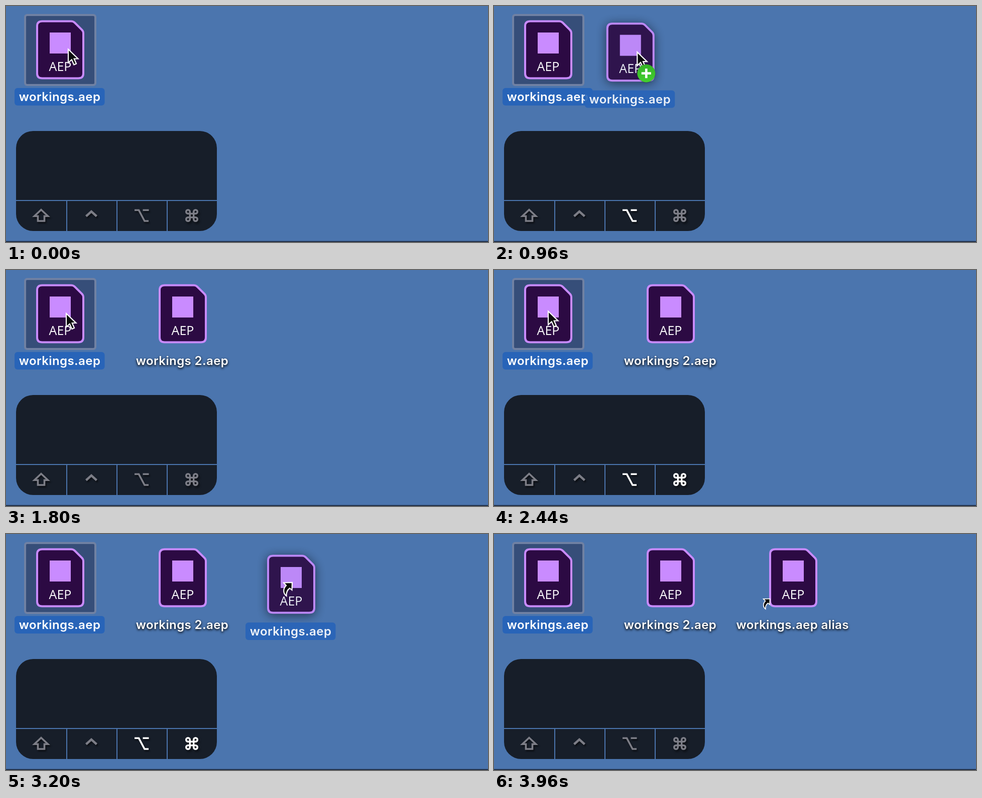
Write an HTML page that moves like this. It is 960 by 472 pixels and loops after 4 s.

```html
<!DOCTYPE html>
<html lang="en">
<head>
<meta charset="utf-8">
<title>Duplicate and alias by dragging</title>
<style>
  html, body { margin: 0; width: 100%; height: 100%; overflow: hidden; background: #4b75ae; }
  svg { display: block; width: 960px; height: 472px; }
  .label {
    font: 600 24px Inter, sans-serif; font-optical-sizing: none; letter-spacing: .4px;
    fill: #fff; text-anchor: middle;
  }
  .free { text-shadow: 0 2px 4px rgba(0, 0, 0, .75), 0 2px 5px rgba(0, 0, 0, .4); }
  .type {
    font: 500 25px "Open Sans", "Noto Sans", sans-serif; font-stretch: 90%;
    fill: #fff; text-anchor: middle;
  }
  .key { fill: none; stroke: #7d7e87; stroke-width: 3.6; filter: drop-shadow(2px 3px 1.5px rgba(0, 0, 0, .55)); }
  .key.on { stroke: #fff; }
  .pointer { fill: #0b0b0c; stroke: #fff; stroke-width: 2.2; stroke-linejoin: miter; }
  #ghost { opacity: .9; }
  #ghost .file { filter: drop-shadow(0 3px 10px rgba(0, 0, 0, .6)); }
</style>
</head>
<body>
<svg viewBox="0 0 960 472">
  <defs>
    <g id="file">
      <path d="M72 30.5H130Q134 30.5 137 33.5L151 47.5Q154 50.5 154 54.5V135Q154 144.5 144 144.5H72Q62 144.5 62 135V40Q62 30.5 72 30.5Z"
            fill="#2c0a43" stroke="#c98bff" stroke-width="4"/>
      <rect x="87" y="53" width="42" height="42" fill="#c98bff"/>
      <text class="type" x="108" y="129.5">AEP</text>
    </g>
    <g id="tag">
      <rect x="17" y="164" width="179.5" height="35" rx="6" fill="#2864b8"/>
      <text class="label" x="107" y="190">workings.aep</text>
    </g>
    <path id="bentArrow" class="pointer" d="M-17 .5L0 0L-.5 15L-5 11.5C-10 15-12 20-11.5 27C-18 22-19 13-12 6Z"/>
    <linearGradient id="green" x2="0" y2="1">
      <stop stop-color="#35b326"/>
      <stop offset="1" stop-color="#43cf2f"/>
    </linearGradient>
    <clipPath id="panelShape"><rect x="20" y="250" width="400" height="200" rx="34"/></clipPath>
  </defs>

  <rect width="960" height="472" fill="#4b75ae"/>
  <rect y="470" width="960" height="2" fill="#22324c"/>

  <g clip-path="url(#panelShape)">
    <rect x="20" y="250" width="400" height="200" fill="#171e29"/>
    <path d="M20 389H420M121 389V450M221 389V450M321 389V450" stroke="#4b75ae" stroke-width="2"/>
  </g>
  <path class="key" d="M70 407.5L83.5 420.3H76.5V430H63.5V420.3H56.5Z"/>
  <path class="key" d="M159.5 420.5L170 411L180.5 420.5" style="stroke-width:4.4"/>
  <path class="key" id="option" d="M256 408.3H264.5L276 430H284M272.5 408.3H284.5"/>
  <path class="key" id="command" transform="translate(355 404) scale(1.25)" style="stroke-width:2.8"
        d="M15 6v12a3 3 0 1 0 3-3H6a3 3 0 1 0 3 3V6a3 3 0 1 0-3 3h12a3 3 0 1 0-3-3"/>

  <rect x="38" y="18" width="140" height="140" rx="4" fill="#364e79" stroke="#7081a3" stroke-width="4"/>
  <use href="#file"/>
  <use href="#tag"/>

  <g id="copy">
    <use href="#file" x="244"/>
    <text class="label free" x="351" y="190">workings 2.aep</text>
  </g>
  <g id="alias">
    <use href="#file" x="488"/>
    <use href="#bentArrow" transform="translate(549.5 129.5) scale(.76)"/>
    <text class="label free" x="594.7" y="190">workings.aep alias</text>
  </g>

  <g id="ghost">
    <use class="file" href="#file"/>
    <use href="#tag"/>
  </g>

  <g id="cursor">
    <path id="arrow" class="pointer" d="M1.5 3.5V30.5L8.3 24.3L12.8 34.5L17.5 32.4L13.2 22.5H21Z"/>
    <g id="plus" transform="translate(19.5 46)">
      <circle cy="1" r="18.3" fill="#000" opacity=".2"/>
      <circle r="18" fill="url(#green)"/>
      <path d="M-9.5 0H9.5M0-9.5V9.5" stroke="#fff" stroke-width="4.6"/>
    </g>
    <use id="bent" href="#bentArrow" x="3.5" y="5"/>
  </g>
</svg>
<script>
  const LOOP = 4000, STEP = 40;

  // Pointer stops: time, x, y
  const stops = [
    [0, 122.5, 83], [440, 118.5, 87], [520, 118.5, 87], [640, 120, 84],
    [1160, 332, 90], [1440, 332, 90], [1760, 118.5, 83.5], [1920, 118.5, 83.5],
    [2360, 106.5, 79], [2480, 106.5, 79], [2960, 566.5, 92], [3520, 566.5, 92],
    [3840, 882, 482], [LOOP, 882, 482]
  ];
  const copyDrag = { from: 640, to: 1400, x: 120, y: 84 };
  const aliasDrag = { from: 2480, to: 3480, x: 106.5, y: 79 };

  const el = id => document.getElementById(id);
  const show = (id, on) => { el(id).style.display = on ? '' : 'none'; };
  const move = (id, x, y) => el(id).setAttribute('transform', `translate(${x} ${y})`);
  const within = (t, from, to) => t >= from && t < to;
  const ease = p => p < .5 ? 4 * p ** 3 : 1 - 4 * (1 - p) ** 3;

  function pointerAt(t) {
    const i = stops.findIndex(s => s[0] > t);
    const [t0, x0, y0] = stops[i - 1], [t1, x1, y1] = stops[i];
    const p = ease((t - t0) / (t1 - t0));
    return [x0 + (x1 - x0) * p, y0 + (y1 - y0) * p];
  }

  function draw(t) {
    const [x, y] = pointerAt(t);
    const drag = [copyDrag, aliasDrag].find(d => within(t, d.from, d.to));
    const linking = drag === aliasDrag;

    move('cursor', x, y);
    show('arrow', !linking);
    show('bent', linking);
    show('plus', drag === copyDrag);

    show('ghost', drag);
    if (drag) move('ghost', x - drag.x, y - drag.y);

    show('copy', t >= copyDrag.to);
    show('alias', t >= aliasDrag.to);

    const aliasKeys = within(t, 2200, 3560);
    el('option').classList.toggle('on', within(t, 320, 1520) || aliasKeys);
    el('command').classList.toggle('on', aliasKeys);
  }

  const start = performance.now();
  function tick(now) {
    const t = Math.max(0, now - start) % LOOP;
    draw(Math.floor(t / STEP) * STEP);
    requestAnimationFrame(tick);
  }
  draw(0);
  requestAnimationFrame(tick);
</script>
</body>
</html>
```
